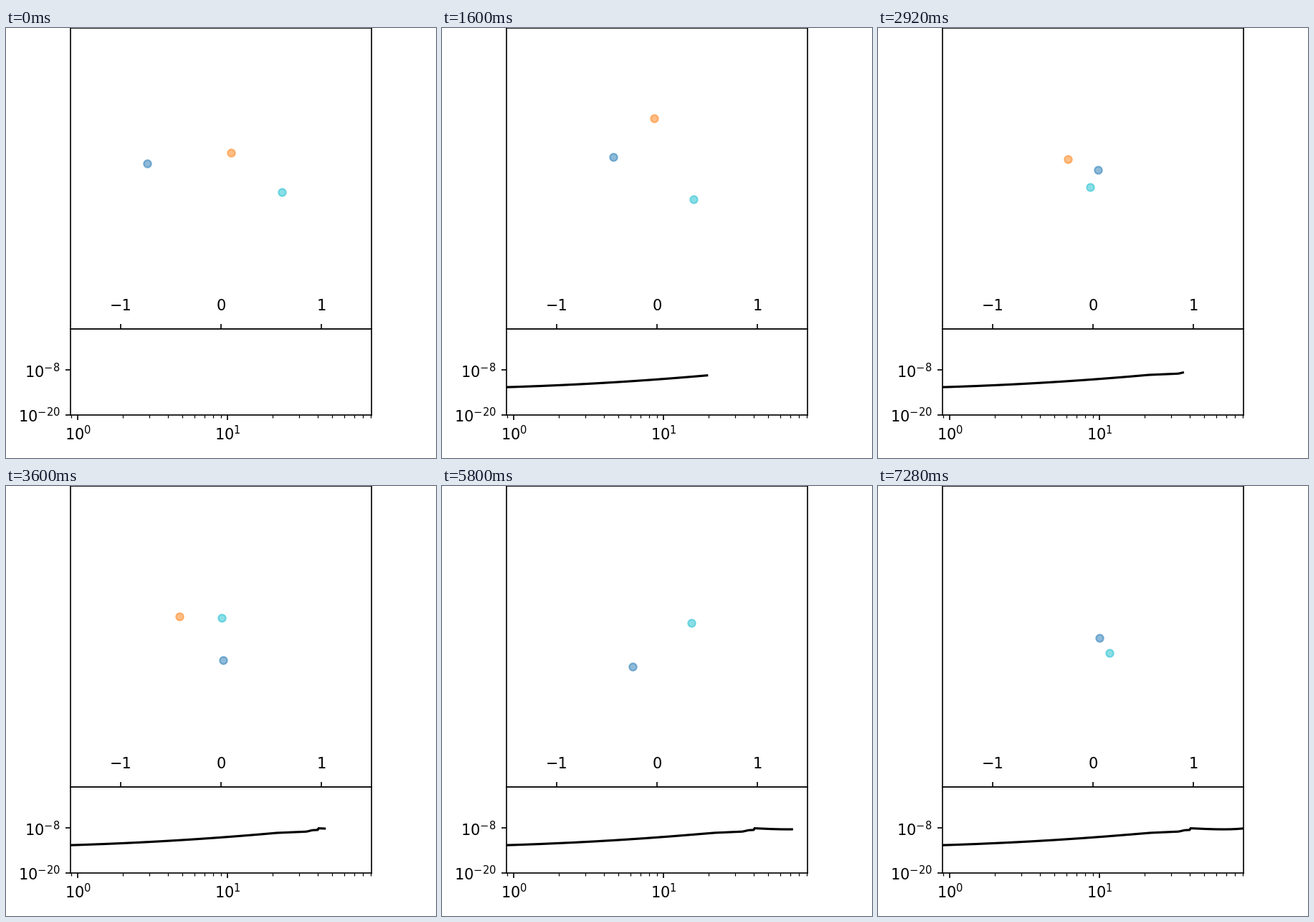
These frames come from a looping animation (600x600 px, 7320 ms). A matplotlib script:

```python
import numpy as np
import matplotlib.pyplot as plt
from matplotlib.animation import FuncAnimation
from matplotlib.ticker import NullLocator

FRAMES, INTERVAL = 183, 40
SCALE = 140                      # pixels per unit of length
LEFT, LIGHT, RIGHT = 14.6, 1.0, 17.6    # masses
ENCOUNTER = 82

t = np.arange(FRAMES)


def smooth(x, start, end):
    s = np.clip((x - start) / (end - start), 0, 1)
    return s * s * (3 - 2 * s)


def hermite(t, *keys):
    """Smooth path through keys of (time, x, y)."""
    keys = np.array(keys)
    k, p = keys[:, 0], keys[:, 1:]
    v = np.gradient(p, k, axis=0, edge_order=2)
    i = np.clip(np.searchsorted(k, t, side="right") - 1, 0, len(k) - 2)
    h = (k[i + 1] - k[i])[:, None]
    s = (t[:, None] - k[i][:, None]) / h
    w = s * s * (3 - 2 * s)
    return (p[i] * (1 - w) + p[i + 1] * w
            + h * s * (1 - s) * ((1 - s) * v[i] - s * v[i + 1]))


def kepler(t, a, e, n, t_apo, apo):
    """Radius and angle on a clockwise ellipse, timed from its far point."""
    E = np.linspace(-2 * np.pi, 2 * np.pi, 8001)[1:-1]
    E = np.interp(n * (t - t_apo), E + e * np.sin(E), E)
    k = np.sqrt((1 - e) / (1 + e))
    phi = 2 * np.arctan2(k * np.sin(E / 2), np.cos(E / 2))
    return np.array([a * (1 + e * np.cos(E)), np.radians(apo) - phi])


def move():
    """Paths of the three bodies around their common centre of mass."""
    # The light body falls in, turns sharply and is thrown out.
    turn = (ENCOUNTER, 307, 230)
    light = np.vstack([
        hermite(t[:ENCOUNTER], (0, 314, 174), (25, 305, 136),
                (40, 295.5, 125.8), (55, 279, 131), (70, 265, 170),
                (75, 266.5, 193), (80, 281, 220.5), turn),
        hermite(t[ENCOUNTER:], turn, (90, 242, 182), (104, 162.5, 117),
                (119, 84.5, 50.5), (182, -238, -225))])
    light = (light - (300, 210)) * (1, -1)

    # The heavy pair moves from a wide ellipse to a tighter one.
    wide = kepler(t, 129.5, 0.847, 0.019585, -84.5, 5)
    tight = kepler(t, 61.68, 0.73, 0.0576, 130.9, -312.6)
    w = smooth(t, 75, 84)
    r, angle = wide * (1 - w) + tight * w
    gap = np.column_stack([r * np.cos(angle), r * np.sin(angle)])

    pair = LEFT + RIGHT
    center = -light * LIGHT / pair
    return np.array([center - gap * RIGHT / pair, light,
                     center + gap * LEFT / pair]) / SCALE


def drift(x):
    """Relative error: slow growth, two bumps, then a shallow dip."""
    L = np.log10(x)
    early = np.minimum(-12.5 + 1.3 * L + 0.85 * L**2, -11.53 + 1.7 * L)
    early += 0.32 * smooth(x, 33, 37.5)
    late = -8.32 + 0.25 * ((x - 67) / 25)**2
    return 10 ** np.where(x < 40.5, early, late)


bodies = move()
days = 0.5 * t[1:]
error = drift(days)

fig = plt.figure(figsize=(4, 4), dpi=150)

ax = fig.add_axes([0.15, 0.3, 0.7, 0.7])
ax.set(xlim=(-1.5, 1.5), ylim=(-1.5, 1.5), xticks=[-1, 0, 1], yticks=[])
ax.tick_params(axis="x", direction="in", pad=-20)

log_ax = fig.add_axes([0.15, 0.1, 0.7, 0.2])
log_ax.set(xscale="log", yscale="log", xlim=(0.893, 91.5), ylim=(1e-20, 1e3))
log_ax.set_yticks([1e-20, 1e-8])
log_ax.yaxis.set_minor_locator(NullLocator())
log_ax.tick_params(axis="x", pad=3)

dots = [ax.plot([], [], "o", ms=5, mew=1, color=c, alpha=0.5)[0]
        for c in ("tab:blue", "tab:orange", "tab:cyan")]
line, = log_ax.plot([], [], color="black")


def update(n):
    for dot, path in zip(dots, bodies):
        dot.set_data([path[n, 0]], [path[n, 1]])
    shown = max(n - 1, 0)
    line.set_data(days[:shown], error[:shown])
    return [*dots, line]


anim = FuncAnimation(fig, update, frames=FRAMES, interval=INTERVAL,
                     repeat=True, repeat_delay=0, init_func=lambda: update(0))
plt.show()
```
